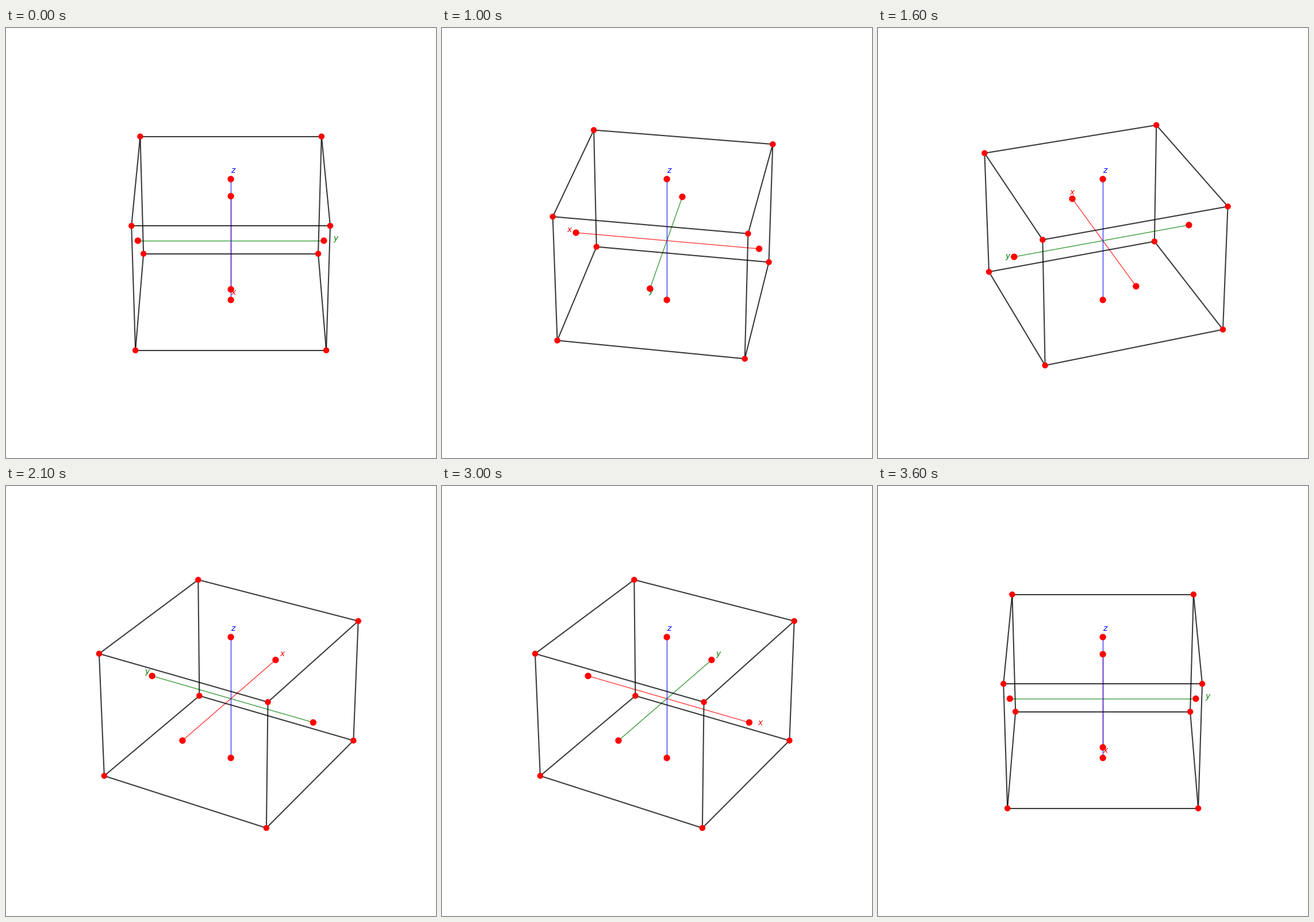
Recreate the animation shown at these times as a matplotlib script. Size 748 px wide and 748 px high, loop 3700 ms.

```python
from itertools import combinations, product

import matplotlib.pyplot as plt
import numpy as np
from matplotlib.animation import FuncAnimation

SIZE = 748
DPI = 100
FRAMES = 37
STEP = 10                                # degrees of azimuth per frame
ELEV = np.radians(30)
DIST = 10                                # camera distance
PLOT = 0.77 * SIZE                       # side of the square plot area
SCALE = PLOT / 0.185
SHIFT = (0.095 / 0.185 - 0.5) * PLOT     # view centre sits up and right
CENTER = np.array([0.5125 * SIZE + SHIFT, 0.505 * SIZE - SHIFT])
HALF = np.array([4, 4, 3]) / 7 / 1.1     # half extents of the box
ALPHA = 0.77
AXES = [("x", "red"), ("y", "green"), ("z", "blue")]


def project(points, azim):
    """Perspective view of box coordinates, in pixels from the top left."""
    x, y, z = (np.asarray(points, float) * HALF).T
    front = x * np.cos(azim) + y * np.sin(azim)
    side = y * np.cos(azim) - x * np.sin(azim)
    up = z * np.cos(ELEV) - front * np.sin(ELEV)
    depth = DIST - front * np.cos(ELEV) - z * np.sin(ELEV)
    return CENTER + SCALE * np.column_stack([side / depth, -up / depth])


corners = np.array(list(product([-1, 1], repeat=3)))
edges = [(i, j) for i, j in combinations(range(8), 2)
         if np.sum(corners[i] != corners[j]) == 1]
units = np.eye(3)
tips = np.vstack([units, -units])

fig = plt.figure(figsize=(SIZE / DPI, SIZE / DPI), dpi=DPI, facecolor="white")
ax = fig.add_axes([0, 0, 1, 1])
ax.set_xlim(0, SIZE)
ax.set_ylim(SIZE, 0)
ax.axis("off")


def segment(color, width):
    return ax.plot([], [], color=color, lw=width, alpha=ALPHA)[0]


def dots(count, area):
    return ax.scatter(np.zeros(count), np.zeros(count), s=area,
                      c=["red"] * count, lw=1.5, zorder=5)


axis_lines = [segment(color, 1) for _, color in AXES]
edge_lines = [segment("black", 1.5) for _ in edges]
labels = [ax.text(0, 0, f"${name}$", color=color, fontsize=10, zorder=3)
          for name, color in AXES]
corner_dots = dots(len(corners), 36)
tip_dots = dots(len(tips), 44)


def update(frame):
    azim = np.radians(STEP * frame)
    box = project(corners, azim)
    ends = project(tips, azim)
    for line, (i, j) in zip(edge_lines, edges):
        line.set_data(box[[i, j]].T)
    for k, line in enumerate(axis_lines):
        line.set_data(ends[[k + 3, k]].T)
    for label, pos in zip(labels, project(1.1 * units, azim)):
        label.set_position(pos)
    corner_dots.set_offsets(box)
    tip_dots.set_offsets(ends)
    return [*axis_lines, *edge_lines, *labels, corner_dots, tip_dots]


anim = FuncAnimation(fig, update, frames=FRAMES, interval=100, repeat=True)
plt.show()
```
